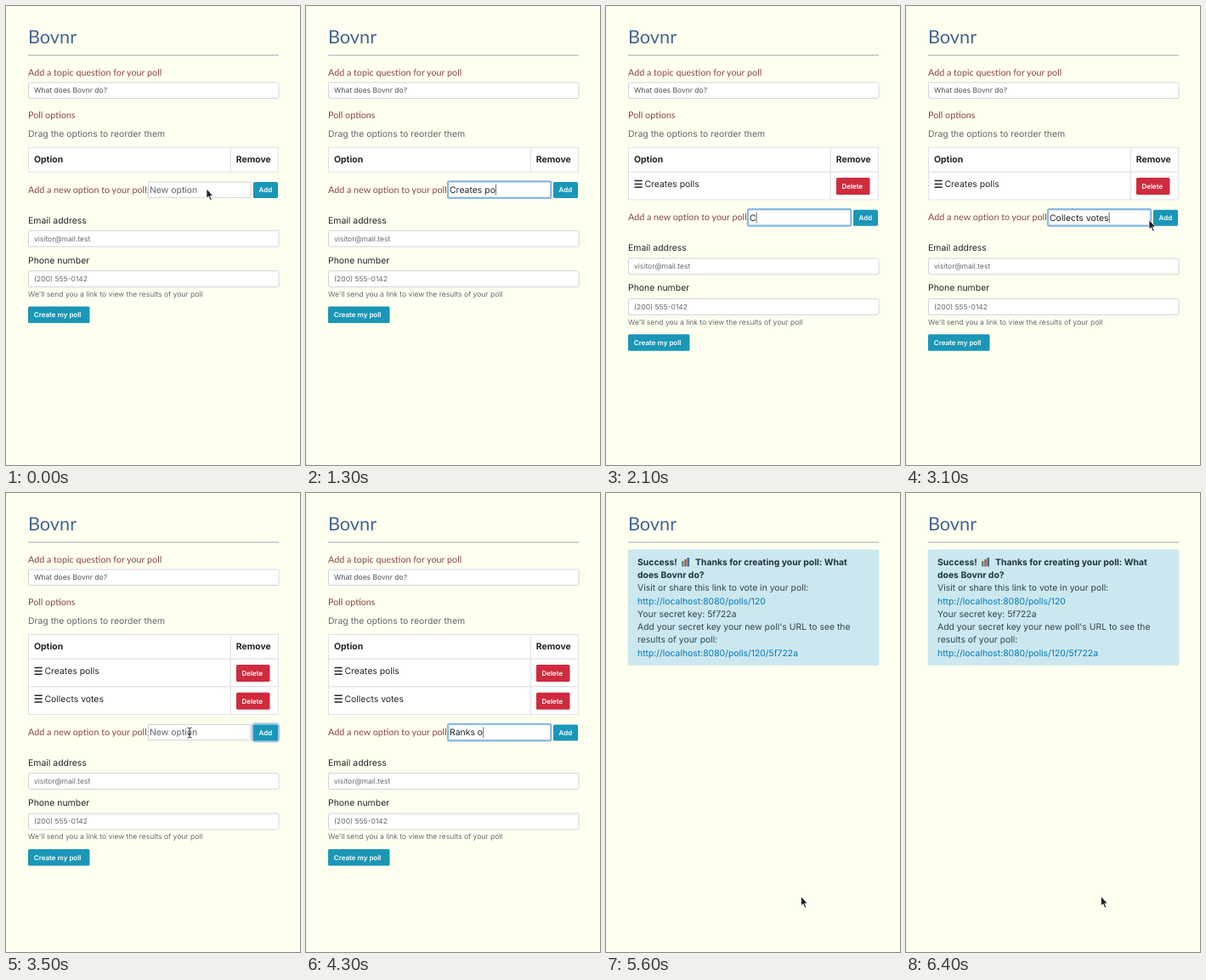
Write an HTML page that moves like this. It is 346 by 540 pixels and loops after 6500 ms.

```html
<!DOCTYPE html>
<html lang="en">
<head>
<meta charset="utf-8">
<title>Poll maker</title>
<style>
  html, body { margin: 0; width: 100%; height: 100%; overflow: hidden; background: #fffff0; }
  svg { display: block; width: 346px; height: 540px; background: #fffff0; }
  text { font: 10.45px Inter, "Open Sans", sans-serif; fill: #212529; white-space: pre; text-rendering: geometricPrecision; }
  .title { font: 21.7px Lato, sans-serif; fill: #426491; }
  .label { font: 10.75px Lato, sans-serif; fill: #8b463f; }
  .head { font-weight: 700; }
  .muted { fill: #5f676e; }
  .small { font-size: 8.5px; fill: #495057; }
  .hint { font-size: 8.5px; fill: #626a71; }
  .button { font-size: 8px; font-weight: 600; fill: #fff; }
  .field { fill: #fff; stroke: #ced4da; }
  .line { fill: none; stroke: #dee2e6; }
  .teal { fill: #1a97b7; }
  .red { fill: #d02a3d; }
  .alert text { font-size: 10.4px; fill: #33434f; }
  .alert .strong { font-weight: 700; fill: #1f3442; }
  .alert .link { fill: #0079b8; }
</style>
</head>
<body>
<svg viewBox="0 0 346 540">
  <text class="title" x="26" y="43.7">Bovnr</text>
  <path d="M26 58H321" stroke="#c3bfcd" stroke-width="1.3"/>

  <g id="form">
    <text class="label" x="26" y="81.7">Add a topic question for your poll</text>
    <rect class="field" x="26.5" y="90" width="294.5" height="18.5" rx="1.5"/>
    <text class="small" x="33" y="102.3">What does Bovnr do?</text>
    <text class="label" x="26" y="132.2">Poll options</text>
    <text class="muted" x="26" y="153.6">Drag the options to reorder them</text>

    <rect class="line" x="26.5" y="166.5" width="294" height="28.7" style="fill:#fff"/>
    <path class="line" d="M264.5 166.5V195"/>
    <text class="head" x="33" y="184.3">Option</text>
    <text class="head" x="270.8" y="184.3">Remove</text>
    <g id="rows"></g>

    <g id="lower">
      <text class="label" x="26" y="219.7">Add a new option to your poll:</text>
      <rect class="field" x="167.5" y="207" width="120.5" height="18.3"/>
      <rect id="optionRing" x="167" y="206.4" width="121.3" height="19.5" rx="1.5" fill="none" stroke="#86b9e6" stroke-width="2.2"/>
      <text id="option" x="169" y="219.9"></text>
      <path id="caret" d="M0 210V222.5" stroke="#444" stroke-width=".8"/>
      <rect id="addRing" x="290" y="206" width="31" height="21" rx="3" fill="none" stroke="#a3c7e8" stroke-width="2.4"/>
      <rect class="teal" x="291" y="207" width="29" height="19" rx="1.5"/>
      <text class="button" x="297.6" y="219.3">Add</text>

      <text x="26" y="255.5">Email address</text>
      <rect class="field" x="26.5" y="264.2" width="294.5" height="18.8" rx="1.5"/>
      <text class="hint" x="33" y="276.6">visitor@mail.test</text>
      <text x="26" y="302.8">Phone number</text>
      <rect class="field" x="26.5" y="311.7" width="294.5" height="18.8" rx="1.5"/>
      <text class="hint" x="33" y="324">(200) 555-0142</text>
      <text class="hint" x="26" y="342">We'll send you a link to view the results of your poll</text>
      <rect class="teal" x="26" y="353.5" width="72.5" height="19.5" rx="1.5"/>
      <text class="button" x="32.8" y="366.2">Create my poll</text>
    </g>
  </g>

  <g id="success" class="alert">
    <rect x="25.5" y="66.5" width="296" height="136.5" rx="2.5" fill="#cce8ef"/>
    <text class="strong" x="37" y="84.7">Success!</text>
    <path d="M89 80h2.6v6.5h-2.6z" fill="#4b9a77"/>
    <path d="M92.2 78h2.6v8.5h-2.6z" fill="#c5524c"/>
    <path d="M95.4 76h2.6v10.5h-2.6z" fill="#356f9f"/>
    <text class="strong" x="105" y="84.7">Thanks for creating your poll: What</text>
    <text class="strong" x="37" y="100">does Bovnr do?</text>
    <text x="37" y="115.3">Visit or share this link to vote in your poll:</text>
    <text class="link" x="37" y="130.6">http://localhost:8080/polls/120</text>
    <text x="37" y="145.9">Your secret key: 5f722a</text>
    <text x="37" y="161.1">Add your secret key your new poll's URL to see the</text>
    <text x="37" y="176.4">results of your poll:</text>
    <text class="link" x="37" y="191.7">http://localhost:8080/polls/120/5f722a</text>
  </g>

  <path id="arrow" d="M0 0V11.3L2.5 9L4.4 13.6L6.3 12.8L4.4 8.4H7.8Z" fill="#1c2026" stroke="#fff" stroke-width=".8"/>
  <path id="beam" d="M-2.5-6Q0-6 0-4.5Q0-6 2.5-6M0-4.5V4.5M-2.5 6Q0 6 0 4.5Q0 6 2.5 6M-1.5 1.5H1.5" fill="none" stroke="#333"/>
</svg>
<script>
const LOOP = 6500, STEP = 100, ROW = 32.7, SUBMIT = 5500;

// Each option is typed from start to end and joins the table at add.
const entries = [
  { text: 'Creates polls', start: 500, end: 1600, add: 1800 },
  { text: 'Collects votes', start: 2100, end: 2900, add: 3200 },
  { text: 'Ranks opinions', start: 3800, end: 4900, add: 5100 },
];

// time, shape, x, y
const pointer = [
  [0, 'arrow', 236, 215], [200, 'beam', 231, 217], [500, 'none'],
  [1600, 'arrow', 262, 219], [1800, 'arrow', 304, 217], [1900, 'arrow', 268, 238],
  [2000, 'beam', 226, 249], [2100, 'none'],
  [3000, 'arrow', 268, 253], [3200, 'arrow', 304, 250], [3300, 'arrow', 290, 263],
  [3400, 'beam', 245, 279], [3500, 'beam', 216, 282], [3800, 'none'],
  [4900, 'arrow', 268, 286], [5000, 'arrow', 302, 283], [5100, 'arrow', 302, 283],
  [5200, 'beam', 266, 307], [5300, 'arrow', 168, 398], [5400, 'arrow', 72, 462],
  [5500, 'arrow', 150, 480], [5600, 'arrow', 229.5, 474.5],
];

const $ = id => document.getElementById(id);
const show = (el, on) => { el.style.display = on ? '' : 'none'; };

$('rows').innerHTML = entries.map(({ text }, i) => `
  <g transform="translate(0 ${i * ROW})">
    <rect class="line back" x="26.5" y="195.2" width="294" height="${ROW}"/>
    <path class="line" d="M264.5 195V${195.2 + ROW}"/>
    <path d="M33.5 205.6h9.2m-9.2 3.8h9.2m-9.2 3.8h9.2" stroke="#212529" stroke-width="1.5"/>
    <text x="45.4" y="213.2">${text}</text>
    <rect class="red" x="271" y="202" width="39.5" height="20" rx="1.5"/>
    <text class="button" x="277.4" y="215">Delete</text>
  </g>`).join('');
const rows = [...$('rows').children];

function drawPointer(t) {
  const i = pointer.findLastIndex(key => key[0] <= t);
  const [t0, shape, x0, y0] = pointer[i];
  for (const name of ['arrow', 'beam']) show($(name), name === shape);
  if (shape === 'none') return;
  const [t1, , x1 = x0, y1 = y0] = pointer[i + 1] || [LOOP];
  const k = (t - t0) / (t1 - t0);
  $(shape).setAttribute('transform', `translate(${x0 + k * (x1 - x0)} ${y0 + k * (y1 - y0)})`);
}

function drawInput(t) {
  const entry = entries.find(e => t >= e.start - 100 && t < e.add);
  let typed = '';
  if (entry && t >= entry.start) {
    const { text, start, end } = entry;
    const k = Math.min(1, (t - start) / (end - start));
    typed = text.slice(0, Math.round(1 + k * (text.length - 1)));
  }
  const option = $('option');
  option.textContent = typed || 'New option';
  option.classList.toggle('muted', !typed);
  for (const id of ['optionRing', 'caret']) show($(id), entry);
  const width = typed ? option.getComputedTextLength() : 0;
  $('caret').setAttribute('transform', `translate(${169.6 + width} 0)`);
  show($('addRing'), !entry && t >= entries[0].add);
}

function draw(now) {
  const t = Math.floor((now % LOOP) / STEP) * STEP;
  const count = entries.filter(e => t >= e.add).length;
  rows.forEach((row, i) => {
    show(row, i < count);
    const hovered = t < entries[i].add + 200;
    row.querySelector('.back').style.fill = hovered ? '#ececec' : '#fff';
  });
  $('lower').setAttribute('transform', `translate(0 ${count * ROW})`);
  show($('form'), t < SUBMIT);
  show($('success'), t >= SUBMIT);
  if (t < SUBMIT) drawInput(t);
  drawPointer(t);
}

const begin = performance.now();
function tick() {
  draw(performance.now() - begin);
  requestAnimationFrame(tick);
}
tick();
</script>
</body>
</html>
```
